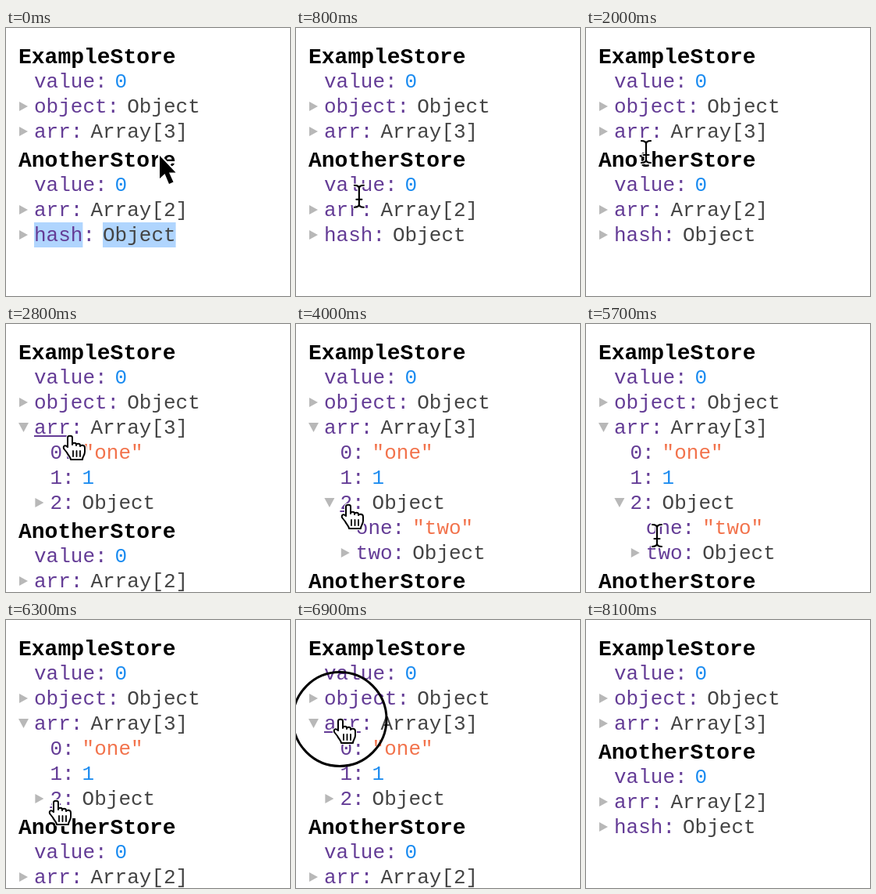
These frames come from a looping animation (364 by 342 pixels, 8.5 s). An HTML page with a canvas:

```html
<!DOCTYPE html>
<html lang="en">
<head>
<meta charset="utf-8">
<title>Store inspector</title>
<style>
  html, body { margin: 0; width: 100%; height: 100%; overflow: hidden; background: #fff; }
  canvas { display: block; }
</style>
</head>
<body>
<canvas id="stage" width="364" height="342"></canvas>
<script>
const ctx = document.getElementById('stage').getContext('2d');
const LOOP = 8500, STEP = 100;
const CHAR = 15.6, ROW = 32, INDENT = 20.4, GAP = 10;
const FONT = '"Liberation Mono", "Courier New", monospace';
const COLOR = { label: '#643c96', number: '#1c8cf0', string: '#f2734c', object: '#444', arrow: '#b8b8b8', selection: '#b0d5fe' };

// open: [from, to] in ms while the children are visible
const node = (label, value, children, open) => ({ label, value, children, open });
const stores = [
  ['ExampleStore', [
    node('value', '0'),
    node('object', 'Object', []),
    node('arr', 'Array[3]', [
      node('0', '"one"'),
      node('1', '1'),
      node('2', 'Object', [
        node('one', '"two"'),
        node('two', 'Object', [node('three', 'Array[3]', [])], [4700, 5600])
      ], [3600, 6300])
    ], [2600, 7100])
  ]],
  ['AnotherStore', [
    node('value', '0'),
    node('arr', 'Array[2]', []),
    node('hash', 'Object', [
      node('a', '1'),
      node('b', 'Array[2]', [])
    ], [1100, 1600])
  ]]
];

const SELECTED_UNTIL = 300, POINTER_LEAVES = 7400;
const presses = [[300, 500], [900, 1100], [1500, 1600], [2400, 2600], [3400, 3600],
  [4500, 4700], [5400, 5600], [6100, 6300], [6900, 7100]];

// Pointer hotspot: [ms, x, y]
const path = [
  [0, 197, 163], [300, 89, 90], [400, 89, 90], [500, 89, 74], [600, 89, 74],
  [900, 78, 264], [1400, 78, 264], [1500, 62, 264], [1600, 62, 262], [1700, 77, 175],
  [1800, 77, 175], [2000, 77, 158], [2300, 76, 127], [2700, 76, 127], [2800, 82, 142],
  [3300, 66, 230], [3900, 66, 230], [4000, 67, 230], [4400, 85, 291], [5500, 85, 291],
  [5700, 91, 270], [6000, 64, 230], [6300, 64, 230], [6800, 57, 126], [7100, 57, 126],
  [7200, 140, 190], [7300, 300, 257], [7400, 364, 290]
];

const during = (t, span) => !!span && t >= span[0] && t < span[1];

function pointerAt(t) {
  const next = path.findIndex(key => key[0] > t);
  if (next < 0) return null;
  const [t0, x0, y0] = path[next - 1], [t1, x1, y1] = path[next];
  const k = (t - t0) / (t1 - t0), ease = k * k * (3 - 2 * k);
  return { x: x0 + (x1 - x0) * ease, y: y0 + (y1 - y0) * ease };
}

function text(string, x, y, color, font = '26px ') {
  ctx.font = font + FONT;
  ctx.fillStyle = color;
  ctx.fillText(string, x, y);
}

function triangle(x, y, isOpen) {
  ctx.fillStyle = COLOR.arrow;
  ctx.fill(new Path2D(isOpen
    ? `M${x} ${y - 6}h13l-6.5 12z`
    : `M${x + 1} ${y - 6}v12l11 -6z`));
}

function valueColor(value) {
  if (value[0] === '"') return COLOR.string;
  return /^\d/.test(value) ? COLOR.number : COLOR.object;
}

// Draws a row; returns whether the pointer is over its clickable label.
function drawRow({ label, value, children }, x, y, isOpen, pointer, selected) {
  const width = label.length * CHAR, valueX = x + width + CHAR + GAP;
  const hovered = !!children && !!pointer && pointer.x >= x && pointer.x <= x + width &&
    pointer.y >= y - 15 && pointer.y < y + 16;
  if (selected) {
    ctx.fillStyle = COLOR.selection;
    ctx.fillRect(x, y - 16, width, 32);
    ctx.fillRect(valueX, y - 16, value.length * CHAR, 32);
  }
  if (children) triangle(x - 20, y, isOpen);
  text(label + ':', x, y + 8, COLOR.label);
  text(value, valueX, y + 8, valueColor(value));
  if (hovered) {
    ctx.fillStyle = COLOR.label;
    ctx.fillRect(x, y + 10, width, 2);
  }
  return hovered;
}

function drawStores(t, pointer) {
  let y = 36, hovered = false;
  const drawNodes = (nodes, depth) => nodes.forEach(item => {
    y += ROW;
    const isOpen = during(t, item.open);
    const selected = item.label === 'hash' && t < SELECTED_UNTIL;
    hovered = drawRow(item, 36 + depth * INDENT, y, isOpen, pointer, selected) || hovered;
    if (isOpen) drawNodes(item.children, depth + 1);
  });
  for (const [title, nodes] of stores) {
    text(title, 16, y + 9, '#000', 'bold 28px ');
    drawNodes(nodes, 0);
    y += ROW + 4;
  }
  return hovered;
}

const shapes = {
  arrow: new Path2D('M0 0V29L6.5 23L12 36L17.5 33.5L12 21.5H20.5Z'),
  beam: new Path2D('M-6 -14Q0 -14 0 -10Q0 -14 6 -14M0 -10V10M-6 14Q0 14 0 10Q0 14 6 14M-3.5 4H3.5'),
  hand: new Path2D('M-3 3C-3 0 3 0 3 3V12C3 9 8 9 8 12V13C8 10 13 10 13 13V14C14 12 19 12 19 16V21C19 26 16 27 16 31H1C1 28 -2 26 -4 22L-8 17C-9 13 -6 12 -3 15Z'),
  fingers: new Path2D('M4 20V27M8.5 20V27M13 20V27')
};

function stroke(shape, color, width) {
  ctx.strokeStyle = color;
  ctx.lineWidth = width;
  ctx.stroke(shape);
}

function drawPointer({ x, y }, kind) {
  ctx.save();
  ctx.translate(x, y);
  ctx.lineJoin = ctx.lineCap = 'round';
  const shape = shapes[kind];
  if (kind === 'hand') {
    stroke(shape, '#fff', 4);
    ctx.fillStyle = '#fff';
    ctx.fill(shape);
    stroke(shape, '#000', 2);
    stroke(shapes.fingers, '#000', 1.8);
  } else if (kind === 'beam') {
    stroke(shape, '#fff', 4.5);
    stroke(shape, '#000', 2.2);
  } else {
    stroke(shape, '#fff', 4);
    ctx.fillStyle = '#000';
    ctx.fill(shape);
  }
  ctx.restore();
}

function draw(t) {
  ctx.fillStyle = '#fff';
  ctx.fillRect(0, 0, 364, 342);
  const pointer = t < POINTER_LEAVES ? pointerAt(t) : null;
  const hovered = drawStores(t, pointer);
  if (!pointer) return;
  const idle = t < STEP || t >= 7200 ? 'arrow' : 'beam';
  drawPointer(pointer, hovered ? 'hand' : idle);
  if (presses.some(span => during(t, span))) {
    const ring = new Path2D();
    ring.arc(pointer.x - 1, pointer.y + 0.5, 60, 0, Math.PI * 2);
    stroke(ring, '#000', 3);
  }
}

const start = performance.now();
function tick() {
  const t = (performance.now() - start) % LOOP;
  draw(Math.floor(t / STEP) * STEP);
  requestAnimationFrame(tick);
}
tick();
</script>
</body>
</html>
```
